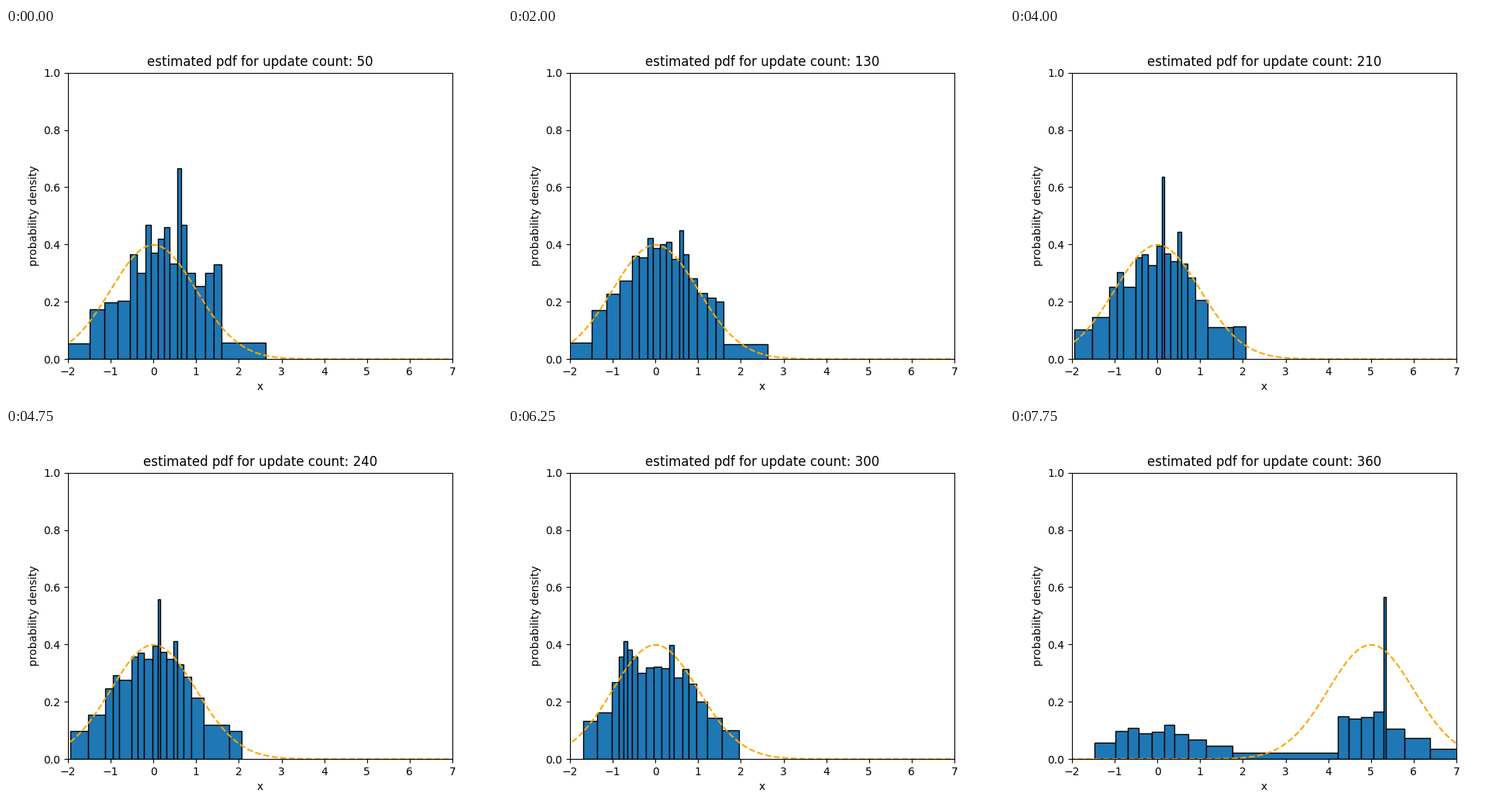
A matplotlib script for the animation above (8000 ms loop, 640x480 px).

```python
import math

import numpy as np
import matplotlib.pyplot as plt
from matplotlib.animation import FuncAnimation
from matplotlib.patches import Rectangle

START, STEP, FRAMES, INTERVAL = 50, 10, 32, 250
SHIFT_AT = 300            # the true mean jumps after this many updates
REBUILD = 100             # updates between two rebuilds of the bins
KEEP = 0.987 ** STEP      # share of old mass that survives one frame

# Each rebuild: the mass every bin starts with, and the quantiles that bound the bins.
rebuilds = [
    (.06, [-2.6, -1.49, -1.145, -.84, -.547, -.383, -.183, -.055, .107, .25,
           .38, .56, .65, .778, .978, 1.214, 1.413, 1.595, 2.63]),
    (.05, [-1.945, -1.527, -1.127, -.947, -.8, -.51, -.365, -.22, -.02, .107,
           .161, .306, .47, .56, .706, .887, 1.177, 1.776, 2.067]),
    (.046, [-1.69, -1.364, -1.02, -.855, -.746, -.655, -.547, -.42, -.22, -.038,
            .143, .325, .433, .633, .778, .96, 1.214, 1.558, 1.958]),
    (.032, [-1.473, -.983, -.693, -.438, -.13, .161, .397, .724, 1.14, 1.758,
            4.226, 4.48, 4.77, 5.06, 5.297, 5.351, 5.787, 6.385, 7.4]),
]


def true_mean(count):
    return 5 if count > SHIFT_AT else 0


def normal_pdf(x, mean):
    return np.exp(-(x - mean) ** 2 / 2) / math.sqrt(2 * math.pi)


def normal_cdf(x, mean):
    return np.array([(1 + math.erf((v - mean) / math.sqrt(2))) / 2 for v in x])


def histogram(count):
    """Bins start with equal mass, then forget it in favour of the true density."""
    epoch = (count - START) // REBUILD
    share, edges = rebuilds[epoch]
    widths = np.diff(edges)
    mass = np.full(len(widths), share)
    for n in range(START + epoch * REBUILD + STEP, count + 1, STEP):
        mass = KEEP * mass + (1 - KEEP) * np.diff(normal_cdf(edges, true_mean(n)))
    return edges, widths, mass / widths


fig, ax = plt.subplots(figsize=(6.4, 4.8), dpi=100)
ax.set(xlim=(-2, 7), ylim=(0, 1), xlabel="x", ylabel="probability density")
title = ax.set_title("")
bars = [ax.add_patch(Rectangle((0, 0), 0, 0, facecolor="tab:blue", edgecolor="black", lw=1))
        for _ in range(18)]
grid = np.linspace(-10, 10, 200)
curve, = ax.plot(grid, normal_pdf(grid, 0), "--", color="orange")


def update(frame):
    count = START + STEP * frame
    for bar, left, width, height in zip(bars, *histogram(count)):
        bar.set_bounds(left, 0, width, height)
    curve.set_ydata(normal_pdf(grid, true_mean(count)))
    title.set_text(f"estimated pdf for update count: {count}")
    return [*bars, curve, title]


anim = FuncAnimation(fig, update, frames=FRAMES, interval=INTERVAL, repeat=True, repeat_delay=0)
plt.show()
```
